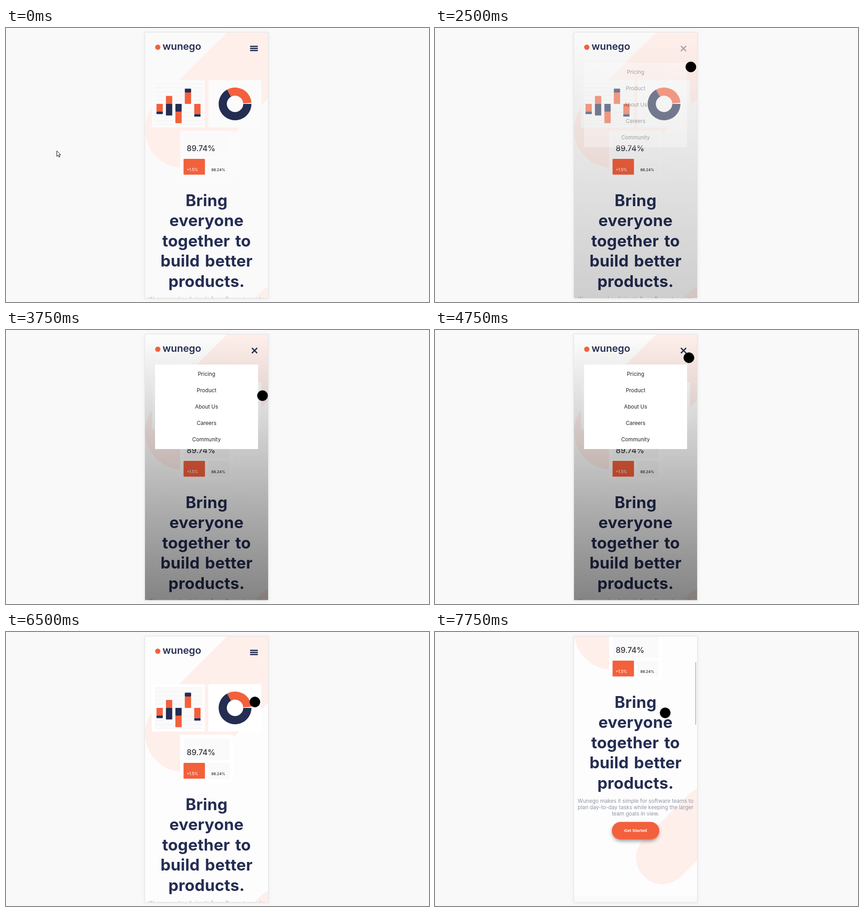
An HTML page for the animation above (8 s loop, 928 by 603 pixels).

```html
<!DOCTYPE html>
<html lang="en">
<head>
<meta charset="utf-8">
<title>Mobile menu</title>
<style>
  html, body { margin: 0; width: 100%; height: 100%; overflow: hidden; background: #f9f9f9; }
  svg { display: block; width: 100vw; height: 100vh; }
  text { font-family: Inter, "Open Sans", sans-serif; font-optical-sizing: none; }
  .mid { text-anchor: middle; }
  .navy { fill: #242d52; }
  .red { fill: #f3603c; }
  .icon { stroke: #242d52; stroke-width: 2.8; }
  .pill { stroke: #ffefeb; stroke-linecap: round; }
  .page { fill: var(--page); }
  .card { fill: var(--card); }
  .tile { fill: #fafafa; }
  .title { font-size: 35px; font-weight: 700; letter-spacing: .25px; word-spacing: 3px; }
  .copy { font-size: 11.6px; fill: #9095a7; }
  .item { font-size: 11.6px; fill: #222; }
</style>
</head>
<body>
<svg id="stage" viewBox="0 0 928 603" fill="none">
  <defs>
    <clipPath id="screen"><rect x="305" y="9.5" width="270" height="585"/></clipPath>
    <linearGradient id="dim" x1="0" y1="0" x2="0" y2="1">
      <stop stop-opacity="0"/>
      <stop offset="1" stop-opacity=".48"/>
    </linearGradient>
    <filter id="soft" x="-20%" y="-40%" width="140%" height="200%"><feGaussianBlur stdDeviation="4"/></filter>
  </defs>

  <rect width="928" height="603" fill="#f9f9f9"/>
  <rect x="304" y="10" width="272" height="586" fill="#000" opacity=".07" filter="url(#soft)"/>
  <rect class="page" x="304.5" y="9.5" width="271" height="585.5"/>

  <g clip-path="url(#screen)">
    <g id="content">
      <path class="pill" d="M388.5 224l300 -300" stroke-width="167"/>
      <path class="pill" d="M499 722l98 -98" stroke-width="116"/>
      <rect class="tile" x="304" y="805" width="272" height="60"/>

      <rect class="card" x="320" y="115" width="116" height="104"/>
      <rect class="card" x="444" y="115" width="116" height="104"/>
      <rect class="card" x="382" y="226" width="116" height="105"/>
      <rect class="tile" x="327" y="122" width="104" height="91"/>
      <g id="grid" stroke="#f1f1f1"></g>
      <g id="bars"></g>
      <g id="donut" stroke-width="18"></g>

      <rect class="tile" x="390" y="234" width="101" height="48" rx="2"/>
      <rect class="tile" x="444" y="288" width="47" height="35" rx="2"/>
      <rect class="red" x="389.5" y="288" width="47" height="34.8" rx="1.5"/>
      <text x="396.5" y="270.5" font-size="17" font-weight="500" fill="#303138">89.74%</text>
      <text x="396.5" y="315.3" font-size="8.4" font-weight="500" fill="#fff">+1.5%</text>
      <text x="450.5" y="315.3" font-size="8" font-weight="500" fill="#222">88.24%</text>

      <g id="title"></g>
      <g id="copy"></g>
      <rect x="389" y="647" width="102" height="38" rx="19" fill="#000" opacity=".4" filter="url(#soft)"/>
      <rect class="red" x="388" y="643" width="104" height="38.5" rx="19.2"/>
      <text class="mid" x="440" y="665" fill="#fff" style="font: 700 9.3px 'Liberation Sans', Arial, sans-serif">Get Started</text>
    </g>

    <rect id="shade" x="304" y="9" width="272" height="586" fill="url(#dim)"/>
    <g id="header">
      <circle class="red" cx="333" cy="42.3" r="5.8"/>
      <text class="navy" x="343.5" y="48.3" font-size="21.8" font-weight="600">wunego</text>
      <path id="burger" class="icon" d="M535.5 40.3h17m-17 4.7h17m-17 4.7h17"/>
      <path id="cross" class="icon" d="M539.5 39.5l11.5 11.5m0-11.5l-11.5 11.5"/>
    </g>
    <g id="menu">
      <rect class="card" x="327" y="76" width="226" height="186"/>
    </g>
    <rect id="thumb" x="571" width="2" height="138" rx="1" fill="#bdbdbd"/>
  </g>
  <rect x="304.5" y="9.5" width="271" height="585.5" stroke="#e3e3e3"/>

  <path id="arrow" d="M-3.5 -6.5v12l2.9-2.6 2 4.3 2-.9-2-4.2h3.7z" fill="#fff" stroke="#000"/>
  <circle id="touch" r="11.3" fill="#000" stroke="#141414"/>
</svg>

<script>
const LOOP = 8000, STEP = 250;
const NAVY = "#242d52", RED = "#f3603c";
const $ = id => document.getElementById(id);
const set = (id, attr, value) => $(id).setAttribute(attr, value);
const clamp = u => Math.min(1, Math.max(0, u));
const smooth = u => u * u * (3 - 2 * u);

function add(parent, tag, attrs, text = "") {
  const el = document.createElementNS($("stage").namespaceURI, tag);
  for (const k in attrs) el.setAttribute(k, attrs[k]);
  el.textContent = text;
  $(parent).append(el);
}

function lines(parent, cls, y, gap, rows) {
  rows.forEach((row, i) => add(parent, "text", { class: cls + " mid", x: 440, y: y + i * gap }, row));
}

// A column of two stacked blocks.
function bar(i, top, upper, lower, fills) {
  const block = (y, height, fill) =>
    add("bars", "rect", { x: 330.2 + i * 20.7, y, width: 13.8, height, rx: 1.2, fill });
  block(top, upper, fills[0]);
  block(top + upper, lower, fills[1]);
}

function arc(from, to, stroke) {
  const point = deg => {
    const a = deg * Math.PI / 180;
    return `${502.5 + 27 * Math.cos(a)} ${167 + 27 * Math.sin(a)}`;
  };
  add("donut", "path", { d: `M${point(from)}A27 27 0 ${+(to - from > 180)} 1 ${point(to)}`, stroke });
}

for (let i = 0; i < 11; i++) add("grid", "path", { d: `M327 ${122.5 + i * 9}h104` });
bar(0, 167, 17, 5.5, [RED, NAVY]);
bar(1, 149.5, 17.5, 25.5, [RED, NAVY]);
bar(2, 167, 17, 25.5, [NAVY, RED]);
bar(3, 133.5, 8.5, 25, [NAVY, RED]);
bar(4, 167, 22.5, 5.5, [RED, NAVY]);
arc(0, 241, NAVY);
arc(241, 356, RED);

lines("title", "title navy", 392, 44.4, ["Bring", "everyone", "together to", "build better", "products."]);
lines("copy", "copy", 601, 13.8, [
  "Wunego makes it simple for software teams to",
  "plan day-to-day tasks while keeping the larger",
  "team goals in view."
]);
lines("menu", "item", 101, 36.1, ["Pricing", "Product", "About Us", "Careers", "Community"]);

// Places where the pointer turns; it eases from one to the next.
const stops = [
  { t: 0, x: 115, y: 277 },
  { t: 1250, x: 548, y: 68 },
  { t: 1750, x: 560, y: 59 },
  { t: 2250, x: 560, y: 59 },
  { t: 3000, x: 565, y: 162 },
  { t: 3500, x: 564, y: 162 },
  { t: 4500, x: 556, y: 50 },
  { t: 4750, x: 557, y: 61 },
  { t: 5750, x: 545, y: 317 },
  { t: 6500, x: 546, y: 154 },
  { t: 7250, x: 539, y: 160 },
  { t: 7750, x: 505, y: 178 }
];

function pointerAt(t) {
  const i = stops.findLastIndex(stop => stop.t <= t);
  const a = stops[i], b = stops[i + 1] || a;
  const u = a === b ? 0 : smooth((t - a.t) / (b.t - a.t));
  return [a.x + (b.x - a.x) * u, a.y + (b.y - a.y) * u];
}

const menuAt = t => Math.min(clamp((t - 2150) / 950), clamp((5700 - t) / 900));
const scrollAt = t => 225 * (1 - (1 - clamp((t - 6890) / 860)) ** 2);

function draw(ms) {
  const t = Math.floor(ms % LOOP / STEP) * STEP;
  const [x, y] = pointerAt(t), menu = menuAt(t), scroll = scrollAt(t);
  const style = $("stage").style;
  style.setProperty("--page", t < 3250 ? "#fafafa" : "#fdfdfd");
  style.setProperty("--card", t < 3250 ? "#fbfbfb" : "#fff");

  for (const id of ["content", "header"]) set(id, "transform", `translate(0 ${-scroll})`);
  for (const id of ["shade", "menu", "cross"]) set(id, "opacity", menu);
  set("burger", "opacity", +(t < 2250 || t >= 5000));
  set("thumb", "opacity", +(scroll > 0));
  set("thumb", "y", 10.5 + scroll * .247);

  const inside = x > 304;
  set("arrow", "opacity", +!inside);
  set("touch", "opacity", +inside);
  for (const id of ["arrow", "touch"]) set(id, "transform", `translate(${x} ${y})`);
}

const start = performance.now();
function tick() {
  draw(performance.now() - start);
  requestAnimationFrame(tick);
}
tick();
</script>
</body>
</html>
```
